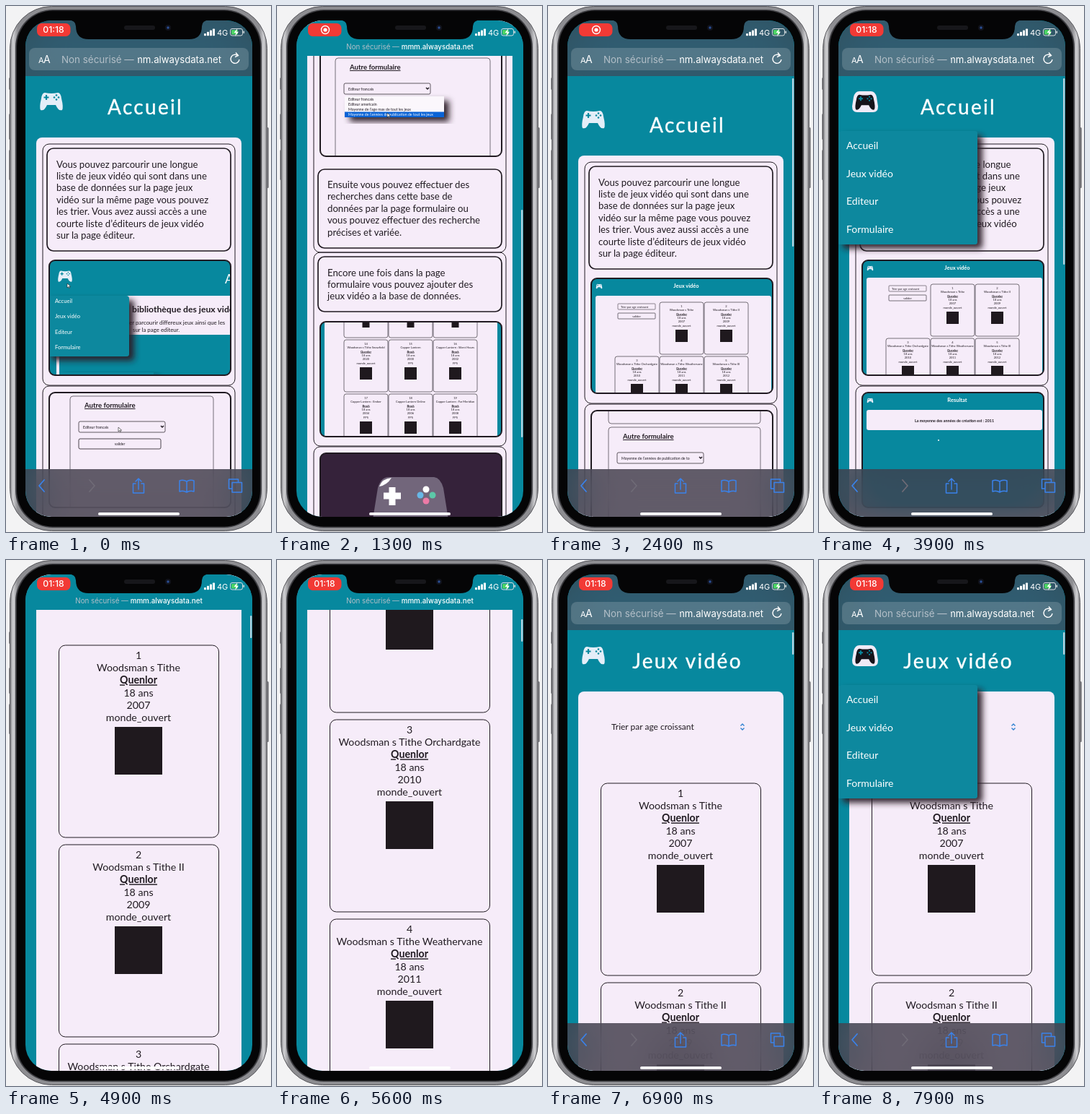
These frames come from a looping animation (368x728 px, 8000 ms). An HTML page:

```html
<!DOCTYPE html>
<html lang="fr">
<head>
<meta charset="utf-8">
<title>Accueil</title>
<style>
html, body { margin: 0; width: 368px; height: 728px; overflow: hidden; background: #f3f3f4; }
svg, #screen, .bar { position: absolute; left: 0; top: 0; }
svg { width: 368px; height: 728px; font-family: Lato, "Open Sans", sans-serif; fill: #211b22; }
#ui { font-family: Inter, Roboto, sans-serif; }
#screen { width: 368px; height: 728px; background: #07889e; clip-path: inset(20px 26px 21px 27px round 36px); }
.bar { width: 368px; backdrop-filter: blur(24px) saturate(1.8); }
#bottom { top: 641px; height: 87px; background: rgba(64, 60, 72, .82); }
</style>
</head>
<body>
<svg id="phone"></svg>
<div id="screen">
  <svg id="page"></svg>
  <div class="bar" id="top"></div>
  <div class="bar" id="bottom"></div>
  <svg id="ui"></svg>
</div>
<svg id="notch"></svg>
<script>
const TEAL = '#07889e', PALE = '#f6ecf9', INK = '#211b22';
const $ = id => document.getElementById(id);

const rect = (x, y, w, h, r, fill, more = '') =>
  `<rect x="${x}" y="${y}" width="${w}" height="${h}" rx="${r}" fill="${fill}" ${more}/>`;
const frame = (x, y, w, h, r, line = 1, fill = 'none') =>
  rect(x, y, w, h, r, fill, `stroke="${INK}" stroke-width="${line}"`);
const text = (x, y, size, str, more = '') => `<text x="${x}" y="${y}" font-size="${size}" ${more}>${str}</text>`;
const mid = (x, y, size, str, more = '') => text(x, y, size, str, 'text-anchor="middle" ' + more);
const group = (x, y, body, more = '') => `<g transform="translate(${x} ${y})" ${more}>${body}</g>`;
const line = (d, color, width = 1.5, more = '') =>
  `<path d="${d}" fill="none" stroke="${color}" stroke-width="${width}" ${more}/>`;
const dot = (x, y, r, fill) => `<circle cx="${x}" cy="${y}" r="${r}" fill="${fill}"/>`;
const square = (x, y, s) => rect(x - s / 2, y, s, s, 0, '#1f191e');
const WHITE = 'fill="#fff"', BOLD = 'font-weight="700"', LINK = BOLD + ' text-decoration="underline"';

const pad = (x, y, s, body = '#e4eef8', detail = TEAL) => group(x, y, `<g transform="scale(${s})">
  <path fill="${body}" d="M-9-12Q0-10 9-12Q13-12 14-4Q17 8 15 12Q10 14 6 5H-6Q-10 14-15 12Q-17 8-14-4Q-13-12-9-12Z"/>` +
  line('M-7-9v7M-10.5-5.5h7', detail, 2.2) +
  [[0, -3], [3, 0], [0, 3], [-3, 0]].map(([a, b]) => dot(7 + a, -5.5 + b, 1.3, detail)).join('') + '</g>');

// ---- Content data
const series = 'Woodsman s Tithe', maker = 'Quenlor';
const games = ['', ' II', ' Orchardgate', ' Weathervane', ' III', ' Tidewater'].map((s, i) =>
  [i + 1, series + s, maker, '18 ans', [2007, 2009, 2010, 2011, 2012, 2013][i], 'monde_ouvert']);
const shooter = 'Copper Lantern';
const others = ['', ' : Silent Hours', ' : Ember', ' Online', ' : Far Meridian'].map((s, i) =>
  [15 + i, shooter + s, 'Brask', '18 ans', 2000 + i * 2, 'FPS']);
others.unshift([14, series + ' Snowfield', maker, '18 ans', 2020, 'monde_ouvert']);

const lines = (x, y, step, size, rows) =>
  rows.map((r, i) => mid(x, y + i * step, size, r, i == 2 ? LINK : '')).join('');
const mini = (x, y, game) => frame(x, y, 61, 72, 3, .6) +
  lines(x + 30.5, y + 7, 5.3, 4.1, game) + square(x + 30.5, y + 38, 17);

// ---- Small demo screens, each 252 x 159
const header = title => rect(0, 0, 252, 159, 0, TEAL) + pad(11, 11, .27) + mid(132, 13, 7.5, title, WHITE + BOLD);
const select = (x, y, w, str) => frame(x, y, w, 15, 2, .7) + text(x + 6, y + 9.5, 5.2, str) +
  line(`M${x + w - 6} ${y + 6}l2 2l2-2`, INK);
const form = (x, y, w, str) => rect(0, 0, 252, 159, 0, PALE) + frame(x, y, w, 180, 4, .6) +
  text(x + 20, y + 16, 9.6, 'Autre formulaire', LINK) + select(x + 12, y + 35, 120, str);
const button = (x, y) => frame(x, y, 114, 14, 2, .8) + mid(x + 57, y + 9, 5, 'valider');
const cursor = (x, y) => `<path d="M${x} ${y}v6l1.6-1.4l1 2l1-.5l-1-2h2z" fill="#fff" stroke="#222" stroke-width=".6"/>`;

const menuItems = ['Accueil', 'Jeux vidéo', 'Editeur', 'Formulaire'];
const menu = (w, y, h, x, y0, step, size) =>
  rect(x - 12, y, w, h, 4, TEAL, 'filter="url(#shade)"') +
  menuItems.map((s, i) => text(x, y0 + i * step, size, s, WHITE)).join('');

const demoMenu = rect(0, 0, 252, 159, 0, TEAL) + pad(22, 22, .62) + text(244, 32, 17, 'Accueil', WHITE) +
  rect(100, 49, 160, 54, 0, PALE) + text(115, 72, 12.2, 'bibliothèque des jeux vidéo', BOLD) +
  text(111, 89, 7.9, 'er parcourir differeux jeux ainsi que les') + text(116, 98.5, 7.9, 'sur la page editeur.') +
  rect(10, 132, 4, 30, 0, PALE) + rect(14, 155, 131, 6, 0, TEAL, 'filter="url(#shade)"') +
  menu(115, 49, 84, 8, 59, 21.4, 7.6) + cursor(25, 32);
const demoGrid = header('Jeux vidéo') + rect(6, 24, 244, 140, 3, PALE) +
  frame(37, 35, 52, 8, 1, .5) + text(41, 41, 4, 'Trier par age croissant') +
  frame(37, 48, 52, 8, 1, .6) + mid(63, 53.5, 4, 'valider') +
  games.slice(0, 5).map((g, i) => i < 2 ? mini(95 + 62 * i, 33, g) : mini(33 + 62 * (i - 2), 108, g)).join('');
const demoForm = form(29, 5, 199, 'Editeur francais') + button(41, 64) + cursor(96, 48);
const demoDrop = form(21, 23, 215, 'Editeur francais') +
  rect(34, 76, 138, 29, 0, '#fbf7fc', 'filter="url(#shade)"') + rect(34, 97.5, 138, 7.5, 0, '#0a63d6') +
  ['Editeur francais', 'Editeur americain', 'Moyenne de l’age max de tout les jeux',
    'Moyenne de l’années de publication de tout les jeux']
    .map((s, i) => text(39, 82 + i * 7, 5.2, s, i == 3 ? WHITE : '')).join('') + cursor(93, 99);
const demoPick = form(24, 23, 211, 'Moyenne de l’années de publication de to') +
  line('M24 0V14Q24 18 28 18H231Q235 18 235 14V0', INK, .6);
const demoResult = header('Resultat') + rect(6, 24, 244, 28, 3, PALE) +
  mid(128, 40.5, 5.4, 'La moyenne des années de création est : 2011', BOLD) + dot(106, 66, 1, '#fff');
const demoShop = rect(0, 0, 252, 159, 0, TEAL) + rect(6, 0, 240, 159, 0, PALE) +
  [33, 95, 157].map(x => frame(x, -50, 61, 72, 3, .6) + square(x + 30.5, -2, 10)).join('') +
  others.map((g, i) => mini(33 + i % 3 * 62, 25 + (i / 3 | 0) * 75, g)).join('');
const demoPad = rect(0, 0, 252, 159, 0, '#35223a') +
  '<path d="M94 33H158Q167 34 171 48L181 110H70L80 48Q84 34 94 33Z" fill="#72667b"/>' +
  '<path d="M82 46Q86 35 99 34Q93 44 82 46Z" fill="#fff"/>' + line('M100 47v25M88 59h24', '#fff', 9) +
  dot(147, 50, 4.5, '#fff') + dot(139, 58, 4.5, '#67b7e6') + dot(156, 58, 4.5, '#5cc9a8') + dot(147, 66, 4.5, '#ec7aa6');

// ---- Pages
const title = str => pad(63, 132, 1) +
  mid(193.5, 150, 28, str, WHITE + ' letter-spacing="2.3" stroke="#fff" stroke-width=".4"');
const paragraph = (y, rows) => rows.map((s, i) => text(70, y + i * 16.4, 13.2, s)).join('');
const card = (y, h) => frame(57, y, 255, h, 9, 1.7);
const block = (y, h) => frame(51, y, 267, h, 9, 1);
const demo = (y, states) => group(60, y, `<g clip-path="url(#demo)">${states}</g>` + frame(0, 0, 252, 159, 8, 2));
const state = (id, body) => `<g id="${id}">${body}</g>`;

const home = title('Accueil') + rect(42, 182, 285, 1210, 8, PALE) +
  block(191, 334) + card(197, 142) + paragraph(223.5, ['Vous pouvez parcourir une longue',
    'liste de jeux vidéo qui sont dans une', 'base de données sur la page jeux', 'vidéo sur la même page vous pouvez',
    'les trier. Vous avez aussi accès a une', 'courte liste d’éditeurs de jeux vidéo', 'sur la page éditeur.']) +
  demo(352, state('a0', demoMenu) + state('a1', demoGrid)) +
  block(526, 301) +
  demo(535, state('b0', demoForm) + state('b1', demoDrop) + state('b2', demoPick) + state('b3', demoResult)) +
  card(712, 109) + paragraph(738, ['Ensuite vous pouvez effectuer des', 'recherches dans cette base de',
    'données par la page formulaire ou', 'vous pouvez effectuer des recherche', 'précises et variée.']) +
  block(827, 268) + card(833, 76) + paragraph(859.5, ['Encore une fois dans la page',
    'formulaire vous pouvez ajouter des', 'jeux vidéo a la base de données.']) +
  demo(923, demoShop) + block(1096, 280) + demo(1105, demoPad);

const shop = title('Jeux vidéo') + rect(42, 182, 285, 2200, 8, PALE) +
  text(88, 235, 12, 'Trier par age croissant') +
  line('M267.5 229.5l2.5-2.5l2.5 2.5M267.5 232.5l2.5 2.5l2.5-2.5', '#2b7fd0', 1.3) +
  games.map((g, i) => {
    const y = 309 + i * 276;
    return frame(73.5, y, 222, 266, 9, 1) + lines(184, y + 19, 17.2, 14.2, g) + square(184, y + 113, 66);
  }).join('');

$('page').innerHTML = `<defs>
  <clipPath id="demo"><rect width="252" height="159" rx="8"/></clipPath>
  <filter id="shade" x="-20%" y="-20%" width="150%" height="150%">
    <feDropShadow dx="7" dy="6" stdDeviation="4" flood-color="#2b1a28" flood-opacity=".95"/></filter></defs>
  <g id="scroll">${state('home', home)}${state('shop', shop)}
    <g id="hot"><path fill="#efeaf6" d="M56 118H72Q78 118 80 126L82 139Q82 147 75 147H53Q46 147 46 139L48 126Q50 118 56 118Z"/>
    ${pad(64, 133, .86, '#15131a')}</g>
    <g id="menu">${menu(194, 173, 157, 38, 198, 38.6, 14)}</g></g>`;

// ---- Browser and status bars
const BLUE = '#3a82ea', GREY = '#b3bfc8', site = 'mmm.alwaysdata.net';
$('ui').innerHTML = '<defs><clipPath id="address"><rect x="183" y="58" width="120" height="31"/></clipPath></defs>' +
  rect(339, 0, 2.4, 0, 1.2, 'rgba(235,235,245,.75)', 'id="thumb"') +
  rect(43, 24, 46.5, 18, 6.5, '#f23a35') +
  state('clock', mid(66, 37.4, 12.2, '01:18', WHITE + ' font-weight="500"')) +
  state('rec', '<circle cx="67" cy="33" r="5.5" fill="none" stroke="#fff" stroke-width="1.4"/>' + dot(67, 33, 2.6, '#fff')) +
  [0, 1, 2, 3].map(i => rect(275 + i * 4, 38 - i * 2.2, 3, 3.2 + i * 2.2, .8, '#fff')).join('') +
  text(293, 41, 11, '4G', WHITE) +
  rect(311.5, 31.5, 17, 9.5, 2.5, 'none', 'stroke="#d5dde0"') + rect(313, 33, 9, 6.5, 1, '#4cd364') +
  rect(329.5, 34.5, 1.5, 3.5, .7, '#d5dde0') + '<path d="M321.5 31l-5 6h3l-1.5 5l5-6.3h-3z" fill="#fff"/>' +
  state('full', rect(32, 58, 305, 31, 8, 'rgba(255,255,255,.17)') +
    text(45, 78.5, 11, 'A', WHITE) + text(52, 78.5, 14, 'A', WHITE) +
    text(77, 78.5, 13.4, 'Non sécurisé —', `fill="${GREY}"`) +
    `<g clip-path="url(#address)">${text(299, 78.5, 13.2, site, WHITE + ' text-anchor="end"')}</g>` +
    line('M322 68.8A6 6 0 1 0 324 74M319 64.5l3.5 4l-4.5 2.2', '#fff', 1.4)) +
  state('small', mid(184.5, 59.6, 9.8,
    `<tspan fill="${GREY}">Non sécurisé —</tspan> <tspan fill="#fff" font-weight="500">${site}</tspan>`)) +
  `<g id="tools" stroke-linejoin="round" stroke-linecap="round">${
    line('M53 656l-7 8l7 8', BLUE, 1.8) + line('M116 656l7 8l-7 8', '#6f6b76', 1.8) +
    line('M180 661h-3.5v13h15v-13H188M184 669V654M180 658l4-4l4 4', BLUE) +
    line('M251 658Q246 655 241 657V672Q246 670 251 673Q256 670 261 672V657Q256 655 251 658V673', BLUE) +
    line('M313 668h-3.5v-13h13v3.5M314 659.5h13.5v13.5h-13.5z', BLUE)}</g>` +
  rect(128, 701, 113, 3.8, 1.9, '#fff');

// ---- Phone body
$('phone').innerHTML = `<defs><linearGradient id="steel"><stop stop-color="#77777b"/><stop offset=".012" stop-color="#d2d2d5"/>
  <stop offset=".03" stop-color="#8d8d91"/><stop offset=".97" stop-color="#8d8d91"/><stop offset=".988" stop-color="#d2d2d5"/>
  <stop offset="1" stop-color="#77777b"/></linearGradient></defs>` +
  [[4, 99, 17], [4, 149, 36], [4, 199, 42], [361, 168, 84]].map(([x, y, h]) => rect(x, y, 4, h, 1.5, '#88888c')).join('') +
  rect(5.5, .5, 357, 726, 58, 'url(#steel)', 'stroke="#55555a"') +
  rect(13, 5, 342, 717, 52, '#3c3c40') + rect(15, 6.5, 338, 714, 50, '#050506');
$('notch').innerHTML = '<path fill="#050506" d="M86 19Q97 20 97 28Q97 46 115 46H254Q272 46 272 28Q272 20 283 19Z"/>' +
  rect(164, 27, 43, 6, 3, '#17171b') + dot(225, 30, 4, '#11131c') + dot(225, 30, 1.7, '#2a4f96');

// ---- Motion
function at(t, keys) {
  const i = keys.findIndex(k => k[0] > t);
  if (i < 0) return keys[keys.length - 1][1];
  if (i == 0) return keys[0][1];
  const [t0, v0] = keys[i - 1], [t1, v1] = keys[i], p = (t - t0) / (t1 - t0);
  return v0 + (v1 - v0) * p * p * (3 - 2 * p);
}
const scrollKeys = [[100, 0], [1300, 486], [1600, 540], [1800, 540], [2300, -30], [2400, -25], [2750, 0],
  [4500, 0], [4900, 191], [5400, 640], [5700, 640], [6200, 360], [6600, -16], [6900, 0]];
const collapseKeys = [[400, 0], [700, 1], [1900, 1], [2150, 0], [4600, 0], [4850, 1], [5750, 1], [6000, 0]];
const menuKeys = [[3250, 0], [3550, 1], [4299, 1], [4300, 0], [7200, 0], [7500, 1]];
const fade = (id, v) => $(id).setAttribute('opacity', Math.max(0, +v));
const shift = (id, x, y) => $(id).setAttribute('transform', `translate(${x} ${y})`);
const pick = (id, n, count) => { for (let i = 0; i < count; i++) fade(id + i, i == n); };

// The top bar turns from translucent grey to solid teal as it collapses.
const clear = [72, 62, 74, .68], solid = [7, 136, 158, 1];
const blend = c => `rgba(${clear.map((v, i) => v + (solid[i] - v) * c)})`;

function draw() {
  const t = Math.floor(performance.now() / 100) * 100 % 8000;
  const y = at(t, scrollKeys), c = at(t, collapseKeys), open = at(t, menuKeys);
  const onHome = t < 4300, rec = t >= 700 && t < 3100;
  shift('scroll', 0, -y);
  fade('home', onHome);
  fade('shop', !onHome);
  fade('hot', open > 0);
  fade('menu', open > 0);
  shift('menu', (open - 1) * 205, 0);
  pick('a', t < 1500 ? 0 : 1, 2);
  pick('b', t < 700 ? 0 : t < 1900 ? 1 : t < 3000 ? 2 : 3, 4);
  fade('rec', rec);
  fade('clock', !rec);

  $('top').style.height = 97 - 28 * c + 'px';
  $('top').style.backgroundColor = blend(c);
  $('bottom').style.transform = `translateY(${70 * c}px)`;
  shift('tools', 0, 70 * c);
  shift('full', 0, -14 * c);
  fade('full', 1 - 1.6 * c);
  fade('small', 1.6 * c - .6);

  fade('thumb', t >= 100);
  $('thumb').setAttribute('y', 100 - 25 * c + Math.max(0, y) * (onHome ? .426 : .011));
  $('thumb').setAttribute('height', onHome ? 258 + 57 * c + Math.min(0, y) : 31);
  requestAnimationFrame(draw);
}
draw();
</script>
</body>
</html>
```
